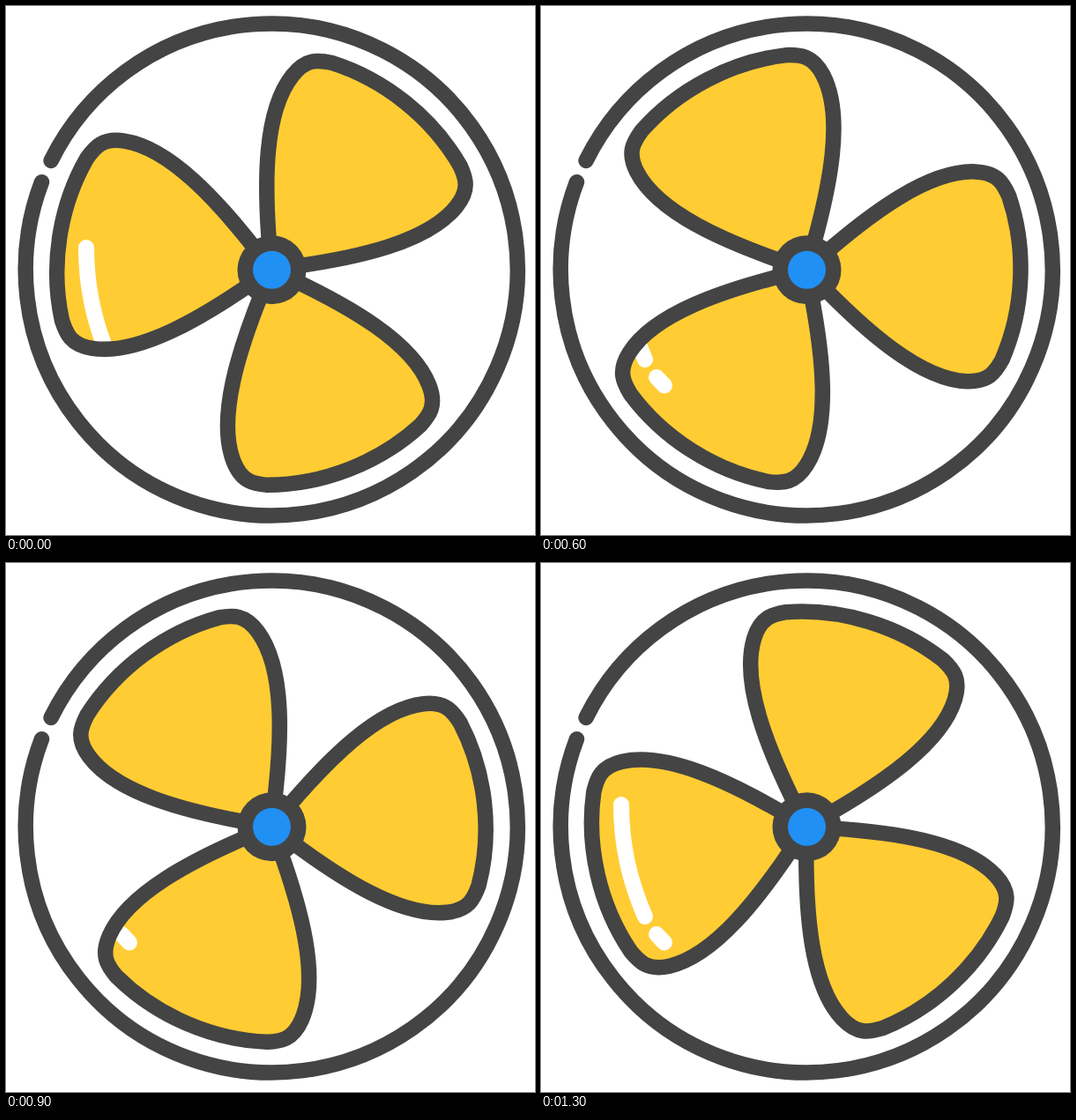
Recreate the animation shown at these times as an HTML page. Size 600x600 px, loop 1.4 s.

```html
<!DOCTYPE html>
<html lang="en">
<head>
<meta charset="utf-8">
<title>Spinning fan</title>
<style>
html, body { margin: 0; width: 100%; height: 100%; overflow: hidden; background: #fff; }
svg { display: block; width: 100%; height: 100%; }
</style>
</head>
<body>
<svg viewBox="0 0 600 600" fill="none" stroke-linecap="round" stroke-linejoin="round">
  <defs>
    <!-- one blade pointing up, hub at the origin -->
    <path id="blade" d="M0 0L19 -20C66 -70 119 -134 119 -187C119 -212 107 -219 93 -226
      C62 -238 30 -243 0 -243C-30 -243 -62 -238 -93 -226C-107 -219 -119 -212 -119 -187
      C-119 -134 -66 -70 -19 -20Z"/>
    <g id="blades">
      <use href="#blade"/>
      <use href="#blade" transform="rotate(120)"/>
      <use href="#blade" transform="rotate(240)"/>
    </g>
  </defs>
  <path d="M51.1 175.4A279 279 0 1 1 40.5 199.7" stroke="#444" stroke-width="17.5"/>
  <use class="spin" href="#blades" fill="#fc3"/>
  <g stroke="#fff" stroke-width="18">
    <path d="M91 274Q91 340 118 401"/>
    <path d="M131 421L140 430.5"/>
  </g>
  <use class="spin" href="#blades" stroke="#444" stroke-width="17.5"/>
  <circle cx="301.5" cy="299.3" r="39" fill="#444"/>
  <circle cx="301.5" cy="299.3" r="21.5" fill="#2090f4"/>
</svg>
<script>
const LOOP = 1400, STEP = 100;
const layers = document.querySelectorAll('.spin');

// The fan speeds up steadily, in hard steps, then starts over.
function draw(now) {
  const n = Math.floor(now % LOOP / STEP);
  const angle = 38.7 + 23.55 * n + 0.9 * n * n;
  for (const layer of layers) {
    layer.setAttribute('transform', `translate(301 299) rotate(${angle})`);
  }
  requestAnimationFrame(draw);
}
draw(0);
</script>
</body>
</html>
```
